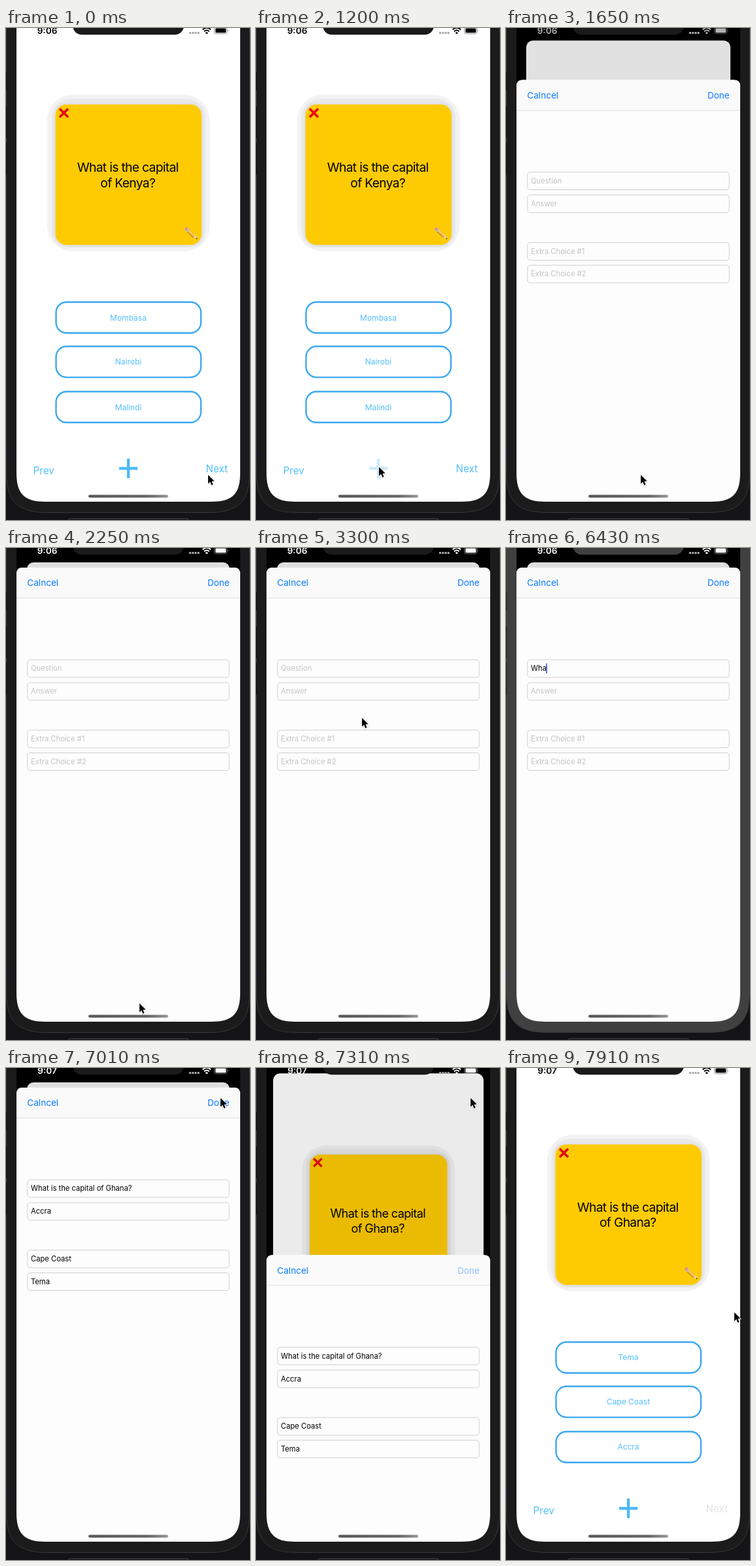
An HTML page that plays this animation: 373x753 px, repeating every 8000 ms.

```html
<!DOCTYPE html>
<html lang="en">
<head>
<meta charset="utf-8">
<title>Flash cards</title>
<style>
html, body { margin: 0; width: 100%; height: 100%; overflow: hidden; background: #141417; }
svg { display: block; width: 100vw; height: 100vh; }
text { font-family: Inter, "Liberation Sans", sans-serif; font-optical-sizing: none; white-space: pre; }
.mid { text-anchor: middle; }
.question { font-size: 19.2px; letter-spacing: -.034em; }
.choice { font-size: 12px; fill: #54bffa; }
.nav { font-size: 15.2px; fill: #54bffa; }
.bar { font-size: 13.6px; fill: #0a7aff; }
.input { font-size: 11.2px; }
.clock { font-size: 13.6px; font-weight: 600; }
.outline { fill: #fff; stroke: #3ca8f0; stroke-width: 2.4; }
.box { fill: none; stroke: #cfcfd1; }
</style>
</head>
<body>
<svg viewBox="0 0 373 753">
  <defs>
    <clipPath id="screen"><path d="M16-15H358V681c0 32-12 44-44 44H60c-32 0-44-12-44-44z"/></clipPath>
    <linearGradient id="homeFill">
      <stop offset="0" stop-color="#565656"/><stop offset=".75" stop-color="#666"/><stop offset="1" stop-color="#979797"/>
    </linearGradient>
    <filter id="soft" x="-20%" y="-20%" width="140%" height="140%"><feGaussianBlur stdDeviation="2.5"/></filter>
  </defs>

  <!-- phone body -->
  <rect width="373" height="753" fill="#141417"/>
  <path d="M95 753q0-2 3-2H276q3 0 3 2" fill="none" stroke="#4a4a4c"/>
  <path class="bezel" d="M.5-10H372.500V679.500c0 45-17 62-62 62H62.500c-45 0-62-17-62-62z" fill="#1b1b1b" stroke="#383838"/>
  <path d="M.5 68v27M.5 120v48M.5 176v49" stroke="#0e0e0e"/>
  <path d="M.5 648v9" stroke="#2b3474"/>

  <g clip-path="url(#screen)">
    <rect x="16" y="-15" width="342" height="740"/>

    <!-- card page -->
    <g id="page">
      <rect x="16" y="-15" width="342" height="760" rx="11" fill="#fff"/>
      <rect x="63" y="102" width="248.500" height="240" rx="39" fill="#f3f3f3"/>
      <rect x="69" y="108" width="236" height="228" rx="30" fill="#ebebeb"/>
      <rect x="74" y="115" width="227" height="219" rx="18" fill="#ddd" filter="url(#soft)"/>
      <rect x="75.500" y="117" width="223.500" height="215" rx="17" fill="#fecb02"/>
      <path d="M82 123.500L95 136.500M95 123.500L82 136.500" stroke="#e60b12" stroke-width="3.700"/>
      <g transform="translate(275 307) rotate(43)">
        <rect x="-1" y="-2.700" width="4" height="5.400" rx="1.500" fill="#e58c93"/>
        <rect x="2.500" y="-2.700" width="2.500" height="5.400" fill="#b9bcc0"/>
        <rect x="5" y="-2.700" width="13" height="5.400" fill="#f0b23c"/>
        <path d="M5-1H18" stroke="#fbd77a" stroke-width="1.400"/>
        <path d="M5 2.400H18" stroke="#a8691d" stroke-width=".8"/>
        <path d="M18-2.700L24 0L18 2.700z" fill="#ecd0a6"/>
        <path d="M21.700-1.100L24.300 0L21.700 1.100z" fill="#333"/>
      </g>
      <text class="question mid" x="186.200" y="220">What is the capital</text>
      <text class="question mid" x="186.200" y="243.500" id="place"></text>
      <g id="choices"></g>
      <text class="nav" x="41.500" y="683">Prev</text>
      <text class="nav" x="305.500" y="680" id="next">Next</text>
      <path id="plus" d="M173 674H201.300M187 659V689" stroke="#4dbaf7" stroke-width="4.400"/>
      <rect id="dim" x="16" y="-15" width="342" height="760" rx="11"/>
    </g>

    <!-- form sheet, laid out with its top at 0 -->
    <g id="sheet">
      <rect x="16" width="342" height="760" rx="9" fill="#fdfdfd"/>
      <path d="M16 46V9q0-9 9-9H349q9 0 9 9V46z" fill="#fafafa"/>
      <path d="M16 46.500H358" stroke="#dedede"/>
      <text class="bar" x="32.300" y="28.300">Calncel</text>
      <text class="bar" x="341.800" y="28.300" text-anchor="end" id="done">Done</text>
      <g id="fields"></g>
      <rect id="caret" y="146.500" width="1.600" height="15.500" fill="#3662d8"/>
    </g>

    <!-- status bar -->
    <g id="status">
      <text class="clock mid" x="63" y="9" id="clock"></text>
      <path d="M280 7.500h16" stroke="#a9a9a9" stroke-width="3" stroke-dasharray="3 1.200"/>
      <g fill="none" stroke="currentColor" stroke-width="2">
        <path d="M300.600 2.600q6.200-5.600 12.400 0M302.900 5.200q3.900-3.400 7.800 0"/>
      </g>
      <path d="M306.800 9.500L304.600 7.200q2.200-1.700 4.400 0z" fill="currentColor"/>
      <rect x="318.500" y="-1" width="19.500" height="9.800" rx="2.800" fill="none" stroke="currentColor" stroke-opacity=".45"/>
      <rect x="320.200" y=".6" width="16.100" height="6.600" rx="1.400" fill="currentColor"/>
      <path d="M339.200 2.400q1.600 1.500 0 3z" fill="currentColor" opacity=".5"/>
    </g>
    <rect x="126" y="714.500" width="122" height="4.200" rx="2.100" fill="url(#homeFill)"/>
  </g>
  <rect class="bezel" x="102" y="-30" width="170" height="40.300" rx="14" fill="#1a1a1a"/>

  <g id="cursor">
    <path d="M.5 1V16.500L4.100 13.200L6.500 19L9.100 18L6.700 12.300L11.500 12z" opacity=".25" filter="url(#soft)"/>
    <path d="M0 0V15.500L3.600 12.200L6 18L8.600 17L6.200 11.300L11 11z" stroke="#fff" stroke-width="1.600" paint-order="stroke"/>
  </g>
</svg>

<script>
const LOOP = 8000, CUT = 6560, SPRING = 18.26;
const $ = id => document.getElementById(id);
const clamp = v => Math.min(1, Math.max(0, v));

const HINTS = ["Question", "Answer", "Extra Choice #1", "Extra Choice #2"];
const FILLED = ["What is the capital of Ghana?", "Accra", "Cape Coast", "Tema"];
const FIELD_TOPS = [140.5, 175.5, 248.3, 283];
const DECKS = [
  { place: "of Kenya?", choices: ["Mombasa", "Nairobi", "Malindi"], time: "9:06" },
  { place: "of Ghana?", choices: ["Tema", "Cape Coast", "Accra"], time: "9:07" }
];

$("choices").innerHTML = [419.5, 487.3, 556.5].map(y =>
  `<rect class="outline" x="76.5" y="${y}" width="221.5" height="47.3" rx="16"/>
   <text class="choice mid" x="187" y="${y + 28}"></text>`).join("");
$("fields").innerHTML = FIELD_TOPS.map(y =>
  `<rect class="box" x="32.8" y="${y + .5}" width="308.4" height="27" rx="4.2"/>
   <text class="input" x="38" y="${y + 17.8}"></text>`).join("");
const choiceTexts = $("choices").querySelectorAll("text");
const fieldTexts = $("fields").querySelectorAll("text");
const bezels = document.querySelectorAll(".bezel");

// pointer stops: time, x, y
const PATH = [
  [0, 309, 684], [150, 308, 691], [300, 300, 704], [450, 285, 707], [600, 262, 705], [750, 236, 699],
  [900, 210, 687], [1050, 188, 672], [1350, 188, 672], [1500, 200, 680], [1650, 206, 684], [2100, 206, 684],
  [2400, 202, 710], [2550, 220, 722], [2700, 256, 695], [2850, 286, 610], [3000, 278, 500], [3150, 252, 404],
  [3300, 162, 260], [3450, 162, 260], [3600, 150, 215], [3750, 143, 178], [5550, 143, 178],
  [5850, 200, 430], [6000, 266, 722], [6559, 266, 722],
  [6560, 290, 160], [6710, 316, 90], [6860, 327, 52], [7010, 328, 46], [7310, 328, 46],
  [7460, 342, 120], [7610, 358, 230], [7760, 361, 325], [7910, 349, 374], [8000, 349, 374]
];

function pointerAt(t) {
  const i = Math.max(1, PATH.findIndex(p => p[0] >= t));
  const [t0, x0, y0] = PATH[i - 1], [t1, x1, y1] = PATH[i];
  const k = (t - t0) / (t1 - t0);
  return [x0 + (x1 - x0) * k, y0 + (y1 - y0) * k];
}

// critically damped spring from 0 to 1
function spring(ms) {
  const x = SPRING * Math.max(0, ms) / 1000;
  return 1 - (1 + x) * Math.exp(-x);
}

function held(t) {
  if (t < 6430) return Math.floor(t / 150) * 150;
  return t < CUT ? 6430 : CUT + Math.floor((t - CUT) / 150) * 150;
}

function setText(node, value) {
  if (node.textContent !== value) node.textContent = value;
}

function draw(now) {
  const t = held(now % LOOP);
  const second = t >= CUT;
  const deck = DECKS[+second];

  setText($("place"), deck.place);
  setText($("clock"), deck.time);
  choiceTexts.forEach((node, i) => setText(node, deck.choices[i]));
  $("next").style.fill = second ? "#e4e4e4" : "";
  $("plus").style.opacity = t >= 1200 && t < 1500 ? .3 : 1;
  $("done").style.opacity = t >= 7160 ? .45 : 1;

  const p = second ? 1 - spring(t - 7239.5) : spring(t - 1414);
  const top = -15 + 37 * p;
  $("page").setAttribute("transform", `translate(187 ${top}) scale(${1 - .094 * p}) translate(-187 15)`);
  $("dim").setAttribute("opacity", .125 * p);
  $("sheet").setAttribute("transform", `translate(0 ${725 - 695 * p})`);
  $("sheet").style.display = p > .002 ? "" : "none";

  const light = second ? 1 - clamp((t - 7330) / 300) : clamp((t - 1420) / 330);
  const tone = `rgb(${Array(3).fill(Math.round(255 * light))})`;
  $("status").style.color = $("status").style.fill = tone;

  const typed = t < 4800 ? "" : "Wha".slice(0, 1 + Math.floor((t - 4800) / 300));
  fieldTexts.forEach((node, i) => {
    const value = second ? FILLED[i] : i ? "" : typed;
    setText(node, value || HINTS[i]);
    node.style.fill = value ? "#000" : "#c4c4c6";
  });
  const caretOn = t >= 4200 && !second && !(t >= 5850 && t < 6150);
  $("caret").style.display = caretOn ? "" : "none";
  $("caret").setAttribute("x", 38.2 + (typed ? fieldTexts[0].getComputedTextLength() - .8 : 0));

  // the window loses focus just before the cut
  bezels.forEach(node => node.style.fill = t === 6430 ? "#404040" : "");
  $("cursor").setAttribute("transform", `translate(${pointerAt(t)}) scale(.87)`);
  $("cursor").style.display = t >= 6150 && !second ? "none" : "";
}

const start = performance.now();
function tick() {
  draw(performance.now() - start);
  requestAnimationFrame(tick);
}
tick();
</script>
</body>
</html>
```
